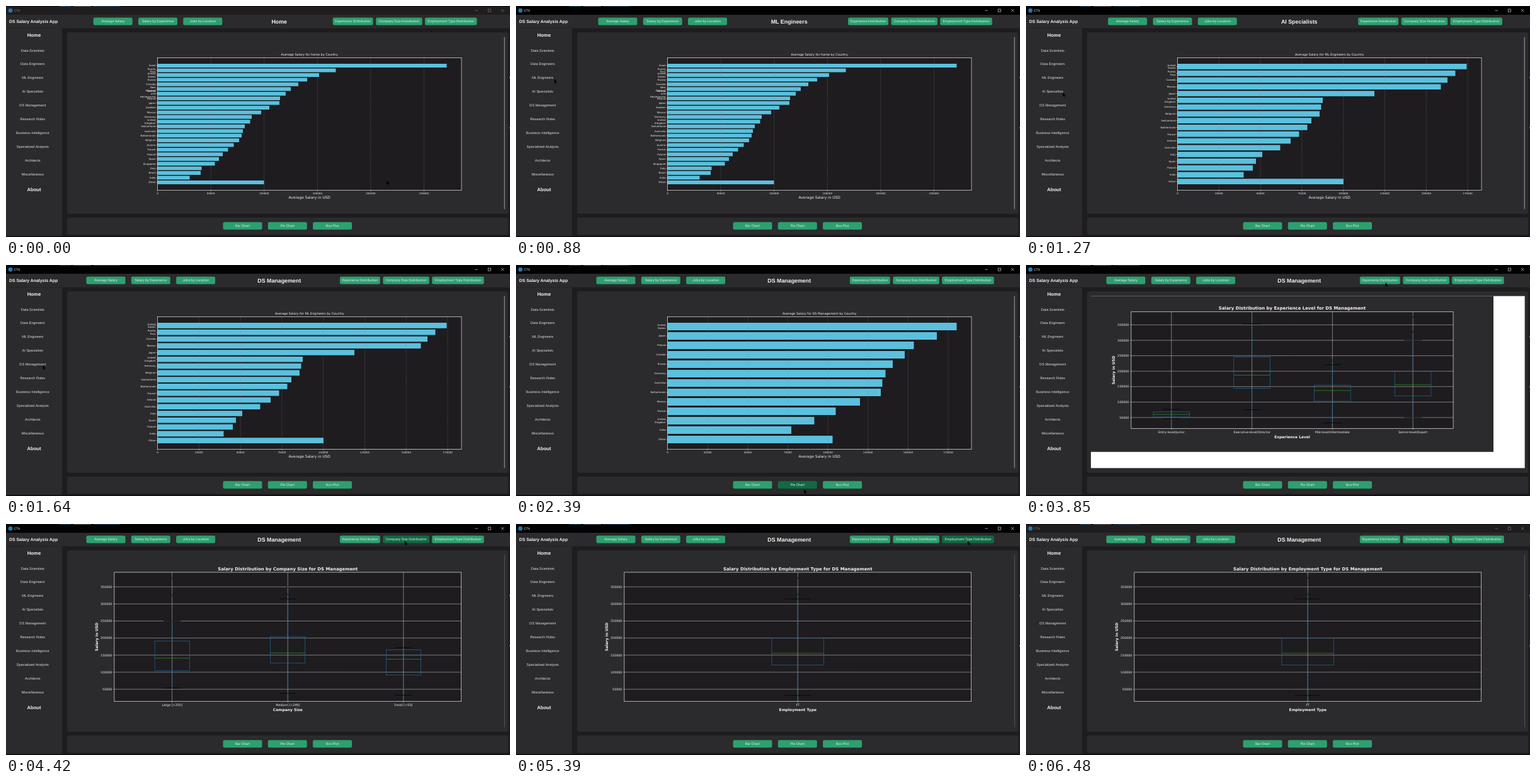
An HTML page with a canvas that plays this animation: 800 px wide and 368 px high, repeating every 6.51 s.

```html
<!DOCTYPE html>
<html lang="en">
<head>
<meta charset="utf-8">
<title>DS Salary Analysis App</title>
<style>
  html, body { margin: 0; width: 100%; height: 100%; overflow: hidden; background: #1e1c1e; }
  canvas { display: block; width: 800px; height: 368px; }
</style>
</head>
<body>
<canvas id="stage"></canvas>
<script>
const W = 800, H = 368, LOOP = 6510;
const canvas = document.getElementById('stage');
const ctx = canvas.getContext('2d');
const dpr = window.devicePixelRatio || 1;
canvas.width = W * dpr;
canvas.height = H * dpr;

const UI = '"Liberation Sans", Arial, sans-serif';
const BTN = 'Roboto, "Liberation Sans", sans-serif';
const PLOT = '"DejaVu Sans", sans-serif';
const PANEL = '#2b2a2c', BACK = '#1e1c1f', GREEN = '#2da06f', GREEN_HOVER = '#116a44';
const PAIRED = ['#a6cee3', '#1f78b4', '#b2df8a', '#33a02c', '#fb9a99',
  '#e31a1c', '#fdbf6f', '#ff7f00', '#cab2d6', '#6a3d9a'];

// Bar lengths are in pixels along an axis 482.5 px wide.
const BARS = {
  home: {
    tick: 50000, step: 84.6, count: 6,
    names: 'Israel,Puerto Rico,United States,Russia,Canada,New Zealand,Bosnia and Herzegovina,Ireland,Japan,Sweden,Mexico,Germany,United Kingdom,Switzerland,Australia,Netherlands,Belgium,Austria,France,Poland,Spain,Singapore,Italy,Brazil,India,Other'.split(','),
    len: [459, 283, 256.5, 237.5, 223.5, 211.5, 203.5, 194.5, 193.5, 177.5, 164.5, 149.5, 147,
      138.5, 135.5, 133.5, 129.5, 121, 112, 103.5, 97.5, 91, 70, 68.5, 51, 169]
  },
  'ML Engineers': {
    tick: 25000, step: 65.8, count: 8,
    names: 'United States,Puerto Rico,Canada,Mexico,Japan,United Kingdom,Germany,Belgium,Switzerland,Netherlands,France,Ireland,Australia,Italy,Spain,Poland,India,Other'.split(','),
    len: [459, 441, 428.5, 418, 312.5, 230.5, 228, 225.5, 212.5, 206, 193, 179.5, 163, 134.5,
      124.5, 119.5, 105, 263.5]
  },
  'DS Management': {
    tick: 25000, step: 63.65, count: 8,
    names: 'United States,Japan,Poland,Canada,Russia,Germany,Australia,Netherlands,Mexico,France,United Kingdom,India,Other'.split(','),
    len: [459, 427.5, 391, 376.5, 357.5, 346, 341, 338.5, 305.5, 267, 233, 196.5, 262]
  }
};

// Each box: low cap, first quartile, median, third quartile, high cap, outliers (thousands of USD)
const BOXES = {
  'Experience Level': [
    ['Entry-level/Junior', 46, 52, 60, 68.3, 76.4],
    ['Executive-level/Director', 75.4, 144.5, 187, 246, 353],
    ['Mid-level/Intermediate', 32.5, 102.8, 137.4, 154.7, 220.8, 235],
    ['Senior-level/Expert', 50, 120, 156, 199.5, 300, 328, 375]
  ],
  'Company Size': [
    ['Large [>250]', 53.7, 104.2, 141, 191.5, 250.4, 326, 375],
    ['Medium [<249]', 38, 126.3, 156.3, 204.4, 314.7, 328, 350],
    ['Small [<50]', 32.4, 91.3, 138, 165.8, 172]
  ],
  'Employment Type': [['FT', 32, 120.8, 155.3, 200.3, 314.7, 328, 376]]
};

const TITLES = [[0, 'Home', 0], [850, 'ML Engineers', 8.3], [1190, 'AI Specialists', 8.5], [1640, 'DS Management', 11.2]];
const CHARTS = [
  [0, () => barChart('home')],
  [960, () => barChart('ML Engineers')],
  [1800, () => barChart('DS Management')],
  [2560, pieChart],
  [3820, () => { rect(103, 49.5, 688.5, 274, '#fff'); boxChart('Experience Level', 639, 248.3); }],
  [3880, () => boxChart('Experience Level')],
  [4390, () => boxChart('Company Size')],
  [5060, () => boxChart('Employment Type')]
];
const HOVERS = [[2300, 2620, 'Pie Chart'], [3540, 3800, 'Experience Distribution'],
  [4250, 4700, 'Company Size Distribution'], [4860, 5620, 'Employment Type Distribution']];
const MOUSE = [[0, 604, 278], [100, 604, 278], [620, 62, 116], [1080, 60, 117], [1270, 58.5, 138],
  [1500, 58, 160], [1900, 60, 160], [2390, 457, 357.5], [2720, 458, 354], [3180, 532, 223],
  [3560, 566, 27], [3850, 570.5, 28], [4100, 572, 28], [4300, 633, 27], [4640, 633, 27],
  [4920, 716, 26], [5540, 717, 27], [6180, 690, -10]];

function rect(x, y, w, h, color, r = 0) {
  ctx.fillStyle = color;
  ctx.beginPath();
  ctx.roundRect(x, y, w, h, r);
  ctx.fill();
}

function line(x1, y1, x2, y2, color, width = 0.7) {
  ctx.strokeStyle = color;
  ctx.lineWidth = width;
  ctx.beginPath();
  ctx.moveTo(x1, y1);
  ctx.lineTo(x2, y2);
  ctx.stroke();
}

function frame(x, y, w, h, color, width) {
  ctx.strokeStyle = color;
  ctx.lineWidth = width;
  ctx.strokeRect(x, y, w, h);
}

// Text centred on cy by its capital height
function text(str, x, cy, size, align = 'center', family = PLOT, weight = 400, color = '#f4f4f4') {
  ctx.font = `${weight} ${size}px ${family}`;
  ctx.textAlign = align;
  ctx.fillStyle = color;
  ctx.fillText(str, x, cy + size * 0.36);
}

function lines(words, x, cy, size, gap, align) {
  words.forEach((w, i) => text(w, x, cy + (i - (words.length - 1) / 2) * gap, size, align));
}

function button(label, x, y, w, hovered) {
  rect(x, y, w, 12, label === hovered ? GREEN_HOVER : GREEN, 2.5);
  text(label, x + w / 2, y + 6, 5.55, 'center', BTN, 400, '#dce8e6');
}

function barChart(name) {
  const { names, len, tick, step, count } = BARS[name];
  const x = 240.5, y = 82.5, w = 482.5, h = 211;
  const pitch = h / (1.1 * (names.length - 0.2));
  const first = y + h / 22 + pitch * 0.4;
  rect(x, y, w, h, BACK);
  names.forEach((n, i) => {
    const cy = first + i * pitch;
    rect(x, cy - pitch * 0.4, len[i], pitch * 0.8, '#5bc0de');
    line(x - 1.8, cy, x, cy, '#fff', 0.5);
    lines(n.split(' '), x - 3, cy, 3.95, 4.5, 'right');
  });
  for (let i = 0; i < count; i++) {
    const tx = x + i * step;
    ctx.setLineDash([1.4, 0.7]);
    if (i) line(tx, y, tx, y + h, 'rgba(140,140,140,.55)', 0.6);
    ctx.setLineDash([]);
    line(tx, y + h, tx, y + h + 1.8, '#fff', 0.5);
    text(i * tick, tx, y + h + 4.8, 4);
  }
  frame(x, y, w, h, '#e8e8e8', 0.7);
  const who = name;
  text(`Average Salary for ${who} by Country`, x + w / 2, y - 5.1, 4.97);
  text('Average Salary in USD', x + w / 2, y + h + 11.8, 5.9);
}

function pieChart() {
  const { names, len } = BARS['DS Management'];
  const cx = 456, cy = 188, r = 84.4;
  const top = len.slice(0, 10), total = top.reduce((a, b) => a + b);
  let angle = 0;
  top.forEach((v, i) => {
    const next = angle - v / total * Math.PI * 2, mid = (angle + next) / 2;
    const px = Math.cos(mid) * r, py = Math.sin(mid) * r;
    ctx.fillStyle = PAIRED[i];
    ctx.beginPath();
    ctx.moveTo(cx, cy);
    ctx.arc(cx, cy, r, angle, next, true);
    ctx.fill();
    lines(names[i].split(' '), cx + px * 1.1, cy + py * 1.1, 5, 6, px > 0 ? 'left' : 'right');
    text((v / total * 100).toFixed(1) + '%', cx + px * 0.6, cy + py * 0.6, 4.85, 'center', PLOT, 400, '#fff');
    angle = next;
  });
  text('Top 10 Average Salary for DS Management by Country', cx, 77, 6.89, 'center', PLOT, 700);
}

function boxChart(kind, cw = 688.5, ch = 274.3) {
  const x = 103 + cw * 0.1, y = 49.5 + ch * 0.1, w = cw * 0.8, h = ch * 0.75;
  const low = 14.3, high = 392.7;
  const py = v => y + h * (high - v) / (high - low);
  const groups = BOXES[kind], n = groups.length, pitch = w / n;
  const bw = pitch * Math.max(0.15, 0.15 * (n - 1));
  const blue = '#1f6ea6', grid = '#a4a4a4';
  rect(103, 49.5, cw, ch, PANEL);
  rect(x, y, w, h, BACK);
  for (let v = 50; v <= 350; v += 50) {
    line(x - 1.8, py(v), x + w, py(v), grid);
    text(v * 1000, x - 3.5, py(v), 4.8, 'right');
  }
  groups.forEach(([label, c0, q1, med, q3, c1, ...out], i) => {
    const cx = x + pitch * (i + 0.5);
    line(cx, y, cx, y + h + 1.8, grid);
    line(cx, py(c0), cx, py(q1), blue, 0.7);
    line(cx, py(q3), cx, py(c1), blue, 0.7);
    for (const c of [c0, c1]) line(cx - bw / 4, py(c), cx + bw / 4, py(c), '#000', 0.8);
    frame(cx - bw / 2, py(q3), bw, py(q1) - py(q3), blue, 0.65);
    line(cx - bw / 2, py(med), cx + bw / 2, py(med), '#2ca02c', 0.7);
    ctx.strokeStyle = '#000';
    ctx.lineWidth = 0.5;
    for (const o of out) {
      ctx.beginPath();
      ctx.arc(cx, py(o), 1.3, 0, 7);
      ctx.stroke();
    }
    text(label, cx, y + h + 5.7, 4.87);
  });
  frame(x, y, w, h, '#e8e8e8', 0.7);
  text(`Salary Distribution by ${kind} for DS Management`, x + w / 2, y - 5.4, 6.92, 'center', PLOT, 700);
  text(kind, x + w / 2, y + h + 13, 5.95, 'center', PLOT, 700);
  ctx.save();
  ctx.translate(x - 28.3, y + h / 2);
  ctx.rotate(-Math.PI / 2);
  text('Salary in USD', 0, 0, 5.95, 'center', PLOT, 700);
  ctx.restore();
}

function titleBar(active) {
  const ink = active ? '#f0f0f0' : '#858385';
  rect(0, 0, W, 14, active ? '#020203' : '#201d1f');
  rect(0, 0, W, 1, '#0c0a0d');
  rect(85, 0, 18, 0.8, '#2d5a78');
  rect(107, 0, 28, 0.8, '#6d6d70');
  rect(139, 0, 42, 0.8, '#2d5a78');
  ctx.fillStyle = '#2577ac';
  ctx.beginPath();
  ctx.arc(7, 7.2, 3.4, 0, 7);
  ctx.fill();
  text('CTk', 12.5, 7.3, 5.2, 'left', UI, 400, ink);
  line(744.5, 7.2, 749, 7.2, ink, 0.6);
  frame(765.2, 5, 4.2, 4.2, ink, 0.6);
  line(786, 5, 790.4, 9.4, ink, 0.6);
  line(790.4, 5, 786, 9.4, ink, 0.6);
}

function sidebar() {
  rect(0, 36, 89, 330, PANEL);
  text('Home', 44.5, 46.2, 7.75, 'center', UI, 700);
  ['Data Scientists', 'Data Engineers', 'ML Engineers', 'AI Specialists', 'DS Management',
    'Research Roles', 'Business Intelligence', 'Specialized Analysts', 'Architects', 'Miscellaneous']
    .forEach((s, i) => text(s, 42.3, 70.5 + i * 21.97, 5.58, 'center', UI, 400, '#dce0e4'));
  text('About', 44.5, 292.5, 7.7, 'center', UI, 700);
}

function header(title, shift, hovered) {
  rect(0, 14, W, 21.5, PANEL);
  text('DS Salary Analysis App', 5, 24.5, 6.9, 'left', UI, 700);
  text(title, 433.7, 24.6, 8.87, 'center', UI, 700);
  ['Average Salary', 'Salary by Experience', 'Jobs by Location']
    .forEach((s, i) => button(s, 138.7 - shift + i * 71.3, 18.5, 62, hovered));
  [['Experience Distribution', 518.7, 64], ['Company Size Distribution', 587.2, 73.5],
    ['Employment Type Distribution', 665, 82.5]]
    .forEach(([s, x, w]) => button(s, x + shift, 18.5, w, hovered));
}

function pointer(t) {
  const k = MOUSE.findIndex(m => m[0] > t);
  if (k < 1) return;
  const [t0, x0, y0] = MOUSE[k - 1], [t1, x1, y1] = MOUSE[k];
  const p = (t - t0) / (t1 - t0), e = p * p * (3 - 2 * p);
  ctx.save();
  ctx.translate(x0 + (x1 - x0) * e, y0 + (y1 - y0) * e);
  ctx.fillStyle = '#000';
  ctx.beginPath();
  [[0, 0], [0, 6.4], [1.5, 5.1], [2.5, 7.3], [3.5, 6.8], [2.5, 4.7], [4.6, 4.6]]
    .forEach(q => ctx.lineTo(...q));
  ctx.fill();
  ctx.restore();
}

const current = (list, t) => list.filter(s => s[0] <= t).pop();

function draw(t) {
  const [, title, shift] = current(TITLES, t);
  const hover = HOVERS.find(h => t >= h[0] && t < h[1]);
  const hovered = hover && hover[2];
  ctx.setTransform(dpr, 0, 0, dpr, 0, 0);
  ctx.textRendering = 'geometricPrecision';
  rect(0, 0, W, H, BACK);
  titleBar(t >= 800 && t < 6300);
  header(title, shift, hovered);
  sidebar();
  rect(97, 42, 700, 289, PANEL, 3);
  rect(97, 337, 700, 27.5, PANEL, 3);
  ['Bar Chart', 'Pie Chart', 'Box Plot']
    .forEach((s, i) => button(s, 344.5 + i * 71.3, 344.3, 62, hovered));
  line(791.2, 49.5, 791.2, 323.5, '#d8d8d8', 0.7);
  current(CHARTS, t)[1]();
  rect(0, 366.6, W, 1.4, '#120c12');
  rect(799, 113, 1, 2, '#8a8a8a');
  rect(799, 193, 1, 2, '#8a8a8a');
  pointer(t);
}

const start = performance.now();
function tick(now) {
  draw(Math.max(0, now - start) % LOOP);
  requestAnimationFrame(tick);
}
draw(0);
requestAnimationFrame(tick);
</script>
</body>
</html>
```
